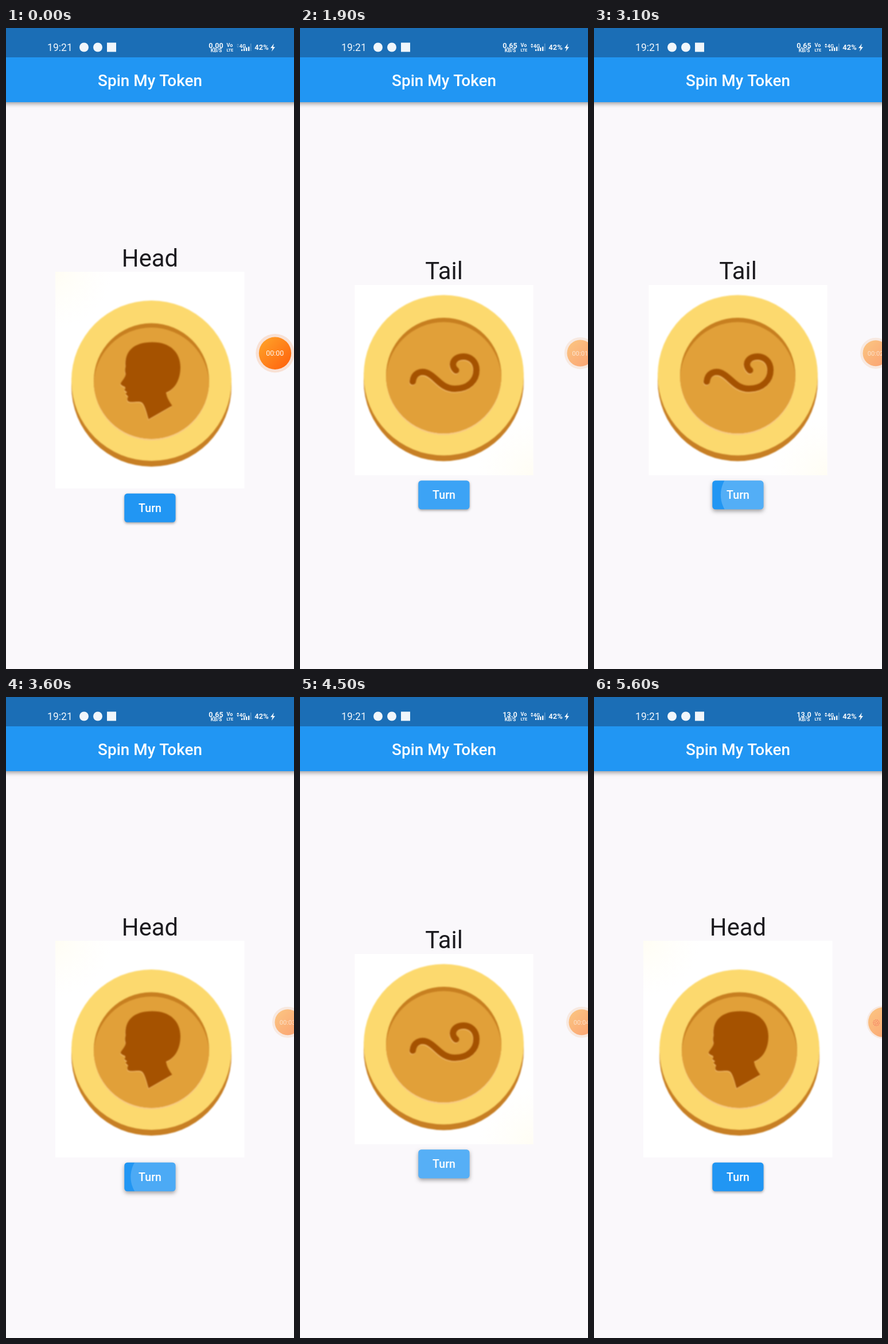
Recreate the animation shown at these times as an HTML page with a canvas. Size 502 px wide and 1115 px high, loop 6.6 s.

```html
<!DOCTYPE html>
<html lang="en">
<head>
<meta charset="utf-8">
<title>Spin My Token</title>
<style>
  html, body { margin: 0; width: 100%; height: 100%; overflow: hidden; background: #faf8fb; }
  canvas { display: block; width: 502px; height: 1115px; }
</style>
</head>
<body>
<canvas id="stage"></canvas>
<script>
const W = 502, H = 1115, LOOP = 6600, STEP = 100;
const BLUE = '#2196f3', BROWN = '#a55200';
const canvas = document.getElementById('stage');
const ctx = canvas.getContext('2d');
const dpr = window.devicePixelRatio || 1;
canvas.width = W * dpr;
canvas.height = H * dpr;

// Each tap: finger down, finger up, touch x, face shown after release
const taps = [
  { down: 1520, up: 1600, x: 262, face: 'Tail' },
  { down: 2340, up: 2420, x: 285, face: 'Head' },
  { down: 2610, up: 2700, x: 285, face: 'Tail' },
  { down: 3030, up: 3200, x: 294, face: 'Head' },
  { down: 3540, up: 3640, x: 280, face: 'Head' },
  { down: 4320, up: 4420, x: 280, face: 'Tail' },
  { down: 5020, up: 5120, x: 280, face: 'Head' }
];

const clamp = v => Math.max(0, Math.min(1, v));
const ramp = (t, from, to) => clamp((t - from) / (to - from));
const mix = (a, b, k) => a + (b - a) * k;
const easeOut = k => 1 - (1 - k) * (1 - k);

function disc(x, y, r, fill, c = ctx) {
  c.beginPath();
  c.arc(x, y, r, 0, Math.PI * 2);
  c.fillStyle = fill;
  c.fill();
}

function box(x, y, w, h, fill) {
  ctx.fillStyle = fill;
  ctx.fillRect(x, y, w, h);
}

function label(str, x, y, size, weight, fill, align = 'center') {
  ctx.font = `${weight} ${size}px Roboto, sans-serif`;
  ctx.textAlign = align;
  ctx.fillStyle = fill;
  ctx.fillText(str, x, y);
}

function shadow(color, blur, dy) {
  ctx.shadowColor = color;
  ctx.shadowBlur = blur * dpr;
  ctx.shadowOffsetY = dy * dpr;
}

function drawBars(t) {
  ctx.save();
  shadow('rgba(0,0,0,.36)', 7, 3);
  box(-10, 0, W + 20, 129, BLUE);
  ctx.restore();
  box(0, 0, W, 51, '#1b6eb6');
  label('Spin My Token', 251, 101, 27.9, 500, '#fff');

  const ink = '#f0f6fb';
  label('19:21', 72, 40, 17.6, 400, ink, 'left');
  disc(136, 33.5, 8, ink);
  disc(160, 33.5, 8, ink);
  box(176, 25.5, 16, 16, ink);

  const speed = t < 100 ? '0.00' : t < 4300 ? '0.65' : '13.0';
  label(speed, 366, 34.5, 12.6, 700, ink);
  label('KB/S', 366.5, 42, 8.7, 700, ink);
  label('Vo', 390, 33, 9, 700, ink);
  label('LTE', 390.3, 40.5, 7.3, 700, ink);
  label('4G', 412.5, 34.5, 9.2, 700, ink);
  drawArrow(30, -1, t >= 400 ? 1 : .25);
  drawArrow(31.5, 1, t >= 1400 ? 1 : .25);
  for (let i = 0; i < 4; i++) box(410 + i * 4, 37 - i * 1.5, 2.4, 3 + i * 1.5, ink);
  box(426, 27, 1.5, 13, 'rgba(255,255,255,.3)');
  label('42%', 445.5, 38, 12.9, 600, ink);
  ctx.fillStyle = ink;
  ctx.beginPath();
  [[467, 27], [461, 35], [464.5, 35], [463, 41], [469, 33], [465.5, 33]]
    .forEach(p => ctx.lineTo(...p));
  ctx.fill();
}

function drawArrow(y, dir, alpha) {
  ctx.fillStyle = `rgba(240,246,251,${alpha})`;
  ctx.beginPath();
  ctx.moveTo(402, y);
  ctx.lineTo(406.4, y);
  ctx.lineTo(404.2, y + dir * 3);
  ctx.fill();
}

function drawCard(x, y, w, h, glowX, glowY) {
  box(x, y, w, h, '#fff');
  const glow = ctx.createRadialGradient(glowX, glowY, 0, glowX, glowY, 100);
  glow.addColorStop(0, 'rgba(255,252,236,.6)');
  glow.addColorStop(1, 'rgba(255,253,244,0)');
  box(x, y, w, h, glow);
}

function profilePath() {
  const p = new Path2D();
  p.moveTo(208.5, 589);
  p.bezierCurveTo(206, 562, 223, 546.5, 255, 546.5);
  p.bezierCurveTo(287, 546.5, 304, 565, 304, 590);
  p.bezierCurveTo(304, 612, 294, 629, 279, 634);
  p.bezierCurveTo(280, 643, 285, 650, 289.5, 657);
  p.lineTo(248.5, 680.5);
  p.bezierCurveTo(245, 668, 242, 657, 238, 652.5);
  p.bezierCurveTo(234, 648, 225, 651, 217, 650.5);
  p.bezierCurveTo(210, 650, 211, 645, 213, 641);
  p.lineTo(208.5, 636.5);
  p.lineTo(211, 633.5);
  p.lineTo(206.5, 630);
  p.bezierCurveTo(208, 627, 209, 625, 206, 623.5);
  p.bezierCurveTo(202, 622, 198.5, 620, 200.5, 617);
  p.bezierCurveTo(204, 612, 209, 606, 208.5, 601);
  p.bezierCurveTo(207, 597, 207.5, 593, 208.5, 589);
  p.closePath();
  return p;
}

function swirlPath() {
  const p = new Path2D();
  p.moveTo(196.5, 615);
  p.bezierCurveTo(198, 601, 210, 595, 222, 600);
  p.bezierCurveTo(238, 607, 246, 627.5, 270, 627.5);
  p.bezierCurveTo(294, 627.5, 307.5, 613, 307.5, 595);
  p.bezierCurveTo(307.5, 580, 297, 571.5, 285, 571.5);
  p.bezierCurveTo(272, 571.5, 265, 580, 267, 588);
  p.bezierCurveTo(268, 592, 270, 594, 272, 595.5);
  return p;
}

// Coin body, centred on the current origin
function drawCoin(c) {
  disc(0, 10, 139.5, '#c77f24', c);
  disc(0, 0, 139.5, '#fcd96e', c);
  disc(0, 3.5, 100.5, '#f9cc83', c);
  c.save();
  disc(0, .5, 100.5, '#c77f20', c);
  c.clip();
  disc(0, 8, 100.5, '#e1a039', c);
  c.restore();
}

// Coin picture kept on its own layer, drawn softly onto the stage
function coinLayer(x, y, paint) {
  const layer = document.createElement('canvas');
  layer.width = canvas.width;
  layer.height = canvas.height;
  const c = layer.getContext('2d');
  c.scale(dpr, dpr);
  c.save();
  c.translate(x, y);
  drawCoin(c);
  c.restore();
  c.lineCap = 'round';
  c.lineWidth = 11;
  for (const [dx, dy, color] of [[-.8, 1.8, '#edb565'], [0, 0, BROWN]]) {
    c.save();
    c.translate(dx, dy);
    c.fillStyle = c.strokeStyle = color;
    paint(c);
    c.restore();
  }
  return layer;
}

const profile = profilePath(), swirl = swirlPath();
const coins = {
  Head: coinLayer(253.5, 613.5, c => c.fill(profile)),
  Tail: coinLayer(250.5, 604, c => c.stroke(swirl))
};

function drawFace(face) {
  const head = face === 'Head';
  label(face, 251, head ? 415.2 : 437.3, 41.8, 400, '#1c1b1f');
  if (head) drawCard(86, 424, 329.5, 377, 86, 424);
  else drawCard(95.5, 447, 311, 331, 406, 778);
  ctx.filter = `blur(${.8 * dpr}px)`;
  ctx.drawImage(coins[face], 0, 0, W, H);
  ctx.filter = 'none';
}

function drawButton(t, face) {
  const x = 206.3, w = 89.2, h = 50, y = face === 'Head' ? 809.7 : 787.2;
  const tap = taps.findLast(p => p.down <= t);
  const lift = tap ? ramp(t, tap.down, tap.down + 90) * (1 - ramp(t, tap.up, tap.up + 200)) : 0;

  ctx.save();
  ctx.beginPath();
  ctx.roundRect(x, y, w, h, 5.2);
  shadow('rgba(0,0,0,.36)', mix(4, 9, lift), mix(2, 4, lift));
  ctx.fillStyle = BLUE;
  ctx.fill();
  ctx.shadowColor = 'transparent';
  ctx.clip();
  if (tap && t < tap.up + 375) {
    const grow = easeOut(ramp(t, tap.down, tap.down + 225));
    const alpha = .24 * ramp(t, tap.down, tap.down + 75) * (1 - ramp(t, tap.up + 225, tap.up + 375));
    disc(mix(tap.x, 251, grow), y + h / 2, mix(40, 60, grow), `rgba(255,255,255,${alpha})`);
  }
  ctx.restore();
  label('Turn', 251, y + 32, 19.5, 500, '#fff');
}

// Floating recorder bubble: docks to the edge, then slips further out
function drawBubble(t) {
  const dock = easeOut(ramp(t, 1600, 2050));
  const leave = easeOut(ramp(t, 5400, 5600));
  const x = mix(mix(469, 491, dock), 504, leave), y = 565.7;
  const r = mix(mix(28.2, 22.5, dock), 26, leave);
  const ring = mix(mix(33.7, 27, dock), 28.8, leave);
  const fade = mix(1, .52, ramp(t, 1600, 1900));

  disc(x, y, ring, dock > 0 ? '#f7e9e1' : '#f8e1d5');
  const g = ctx.createLinearGradient(x - r * .7, y - r * .7, x + r * .7, y + r * .7);
  g.addColorStop(0, '#ff9c26');
  g.addColorStop(1, '#ff6910');
  ctx.save();
  ctx.globalAlpha = fade;
  disc(x, y, r, g);
  ctx.restore();

  if (leave > 0) {
    ctx.save();
    ctx.strokeStyle = '#f58266';
    ctx.lineWidth = 1.3;
    ctx.setLineDash([2, 1]);
    for (const q of [5, 2.3]) {
      ctx.beginPath();
      ctx.arc(x - 12, y + 1, q, 0, Math.PI * 2);
      ctx.stroke();
    }
    ctx.restore();
    return;
  }
  const secs = t < 1000 ? 0 : 1 + Math.floor((t - 1000) / 1100);
  label('00:0' + secs, x - .3, 570.2, mix(12.5, 11.2, dock), 400,
    `rgba(255,255,255,${mix(.95, .6, dock)})`);
}

function draw(t) {
  ctx.setTransform(dpr, 0, 0, dpr, 0, 0);
  box(0, 0, W, H, '#faf8fb');
  const flip = taps.findLast(p => p.up <= t);
  const face = flip ? flip.face : 'Head';
  drawBars(t);
  drawFace(face);
  drawButton(t, face);
  drawBubble(t);
}

const start = performance.now();
function tick() {
  const t = (performance.now() - start) % LOOP;
  draw(Math.floor(t / STEP) * STEP);
  requestAnimationFrame(tick);
}
tick();
</script>
</body>
</html>
```
